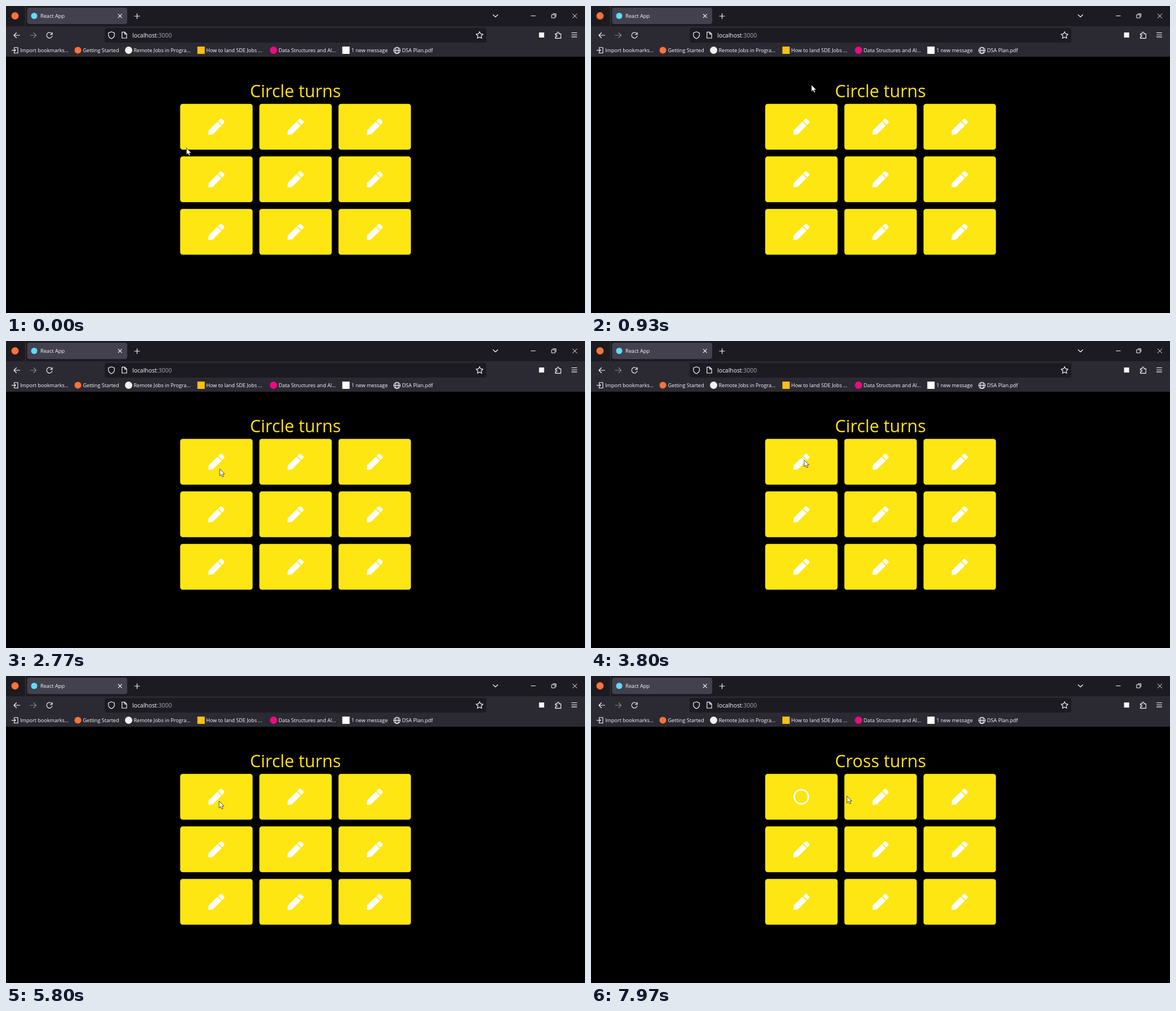
Recreate the animation shown at these times as an HTML page. Size 1027 by 545 pixels, loop 8 s.

```html
<!DOCTYPE html>
<html lang="en">
<head>
<meta charset="utf-8">
<title>React App</title>
<style>
html, body { margin: 0; width: 100%; height: 100%; overflow: hidden; background: #000; }
svg { display: block; width: 1027px; height: 545px; font-family: "Open Sans", "Noto Sans", sans-serif; }
.ui { font-size: 9.07px; fill: #fbfbfe; }
.line { fill: none; stroke: #fbfbfe; stroke-width: 1.15; stroke-linecap: round; stroke-linejoin: round; }
.title { font-size: 30.5px; fill: #ffe21c; text-anchor: middle; }
.before { animation: before 8s step-end infinite; }
.after { animation: after 8s step-end infinite; }
.cursor { animation: roam 8s linear infinite; }
@keyframes before { 0% { visibility: visible } 90%, 100% { visibility: hidden } }
@keyframes after { 0% { visibility: hidden } 90%, 100% { visibility: visible } }
@keyframes roam {
  0% { transform: translate(320px, 252px) }
  4% { transform: translate(327px, 236px) }
  8% { transform: translate(360px, 176px) }
  10.4% { transform: translate(390px, 144px) }
  11.625% { transform: translate(391px, 140px) }
  13.25% { transform: translate(384px, 134px) }
  18.74% { transform: translate(384px, 134px) }
  18.75% { transform: translate(151px, 258px) }
  21.5% { transform: translate(151px, 258px) }
  23.5% { transform: translate(285px, 367px) }
  25.875% { transform: translate(378px, 256px) }
  29.625% { transform: translate(367px, 224px) }
  32% { transform: translate(367px, 224px) }
  32.5% { transform: translate(379px, 226px) }
  34.5% { transform: translate(379px, 226px) }
  35.5% { transform: translate(380px, 234px) }
  37.875% { transform: translate(378px, 211px) }
  47.5% { transform: translate(378px, 211px) }
  50% { transform: translate(381px, 204px) }
  52.5% { transform: translate(379px, 209px) }
  61.75% { transform: translate(379px, 209px) }
  66% { transform: translate(351px, 212px) }
  71.75% { transform: translate(377px, 221px) }
  72.5% { transform: translate(378px, 222px) }
  73.625% { transform: translate(378px, 222px) }
  75.5% { transform: translate(385px, 209px) }
  87.1% { transform: translate(385px, 209px) }
  88% { transform: translate(386px, 208px) }
  90% { transform: translate(386px, 208px) }
  91.75% { transform: translate(381px, 219px) }
  94.5% { transform: translate(390px, 244px) }
  97.5% { transform: translate(438px, 226px) }
  99.6%, 100% { transform: translate(454px, 213px) }
}
</style>
</head>
<body>
<svg viewBox="0 0 1027 545">
  <defs>
    <path id="pen" transform="translate(-14.3 -14.3) scale(.0559)" fill="#fff"
      d="M291 93 419 221 141 499 27 512Q-1 514 0 485L13 371ZM498 74 438 14Q404-14 370 14L313 71 441 199 498 142Q526 108 498 74Z"/>
    <rect id="tile" width="128.4" height="81.2" rx="4.5" fill="#fee612"/>
    <g id="card"><use href="#tile"/><use href="#pen" x="64.1" y="40.6"/></g>
    <g id="pair"><use href="#card" x="449.4" /><use href="#card" x="589.8"/></g>
  </defs>

  <rect width="1027" height="545"/>
  <rect width="1027" height="36" fill="#1c1b22"/>
  <rect y="36" width="1027" height="54" fill="#2b2a33"/>

  <!-- tab strip -->
  <circle cx="16" cy="17.5" r="6.5" fill="#ff7139"/>
  <path d="M34.5 0V36" stroke="#3a3944"/>
  <rect x="37.5" y="3" width="177.5" height="29" rx="4" fill="#42414d"/>
  <circle cx="50" cy="17.5" r="5.5" fill="#61dafb"/>
  <text class="ui" x="61" y="21" style="font-size:9.2px">React App</text>
  <g class="line">
    <path d="M199.2 14.7l6 6m0-6l-6 6M228 18h9m-4.500-4.500v9M864 15.500l4.200 4 4.200-4"/>
    <path stroke-width="1" d="M931.500 17.500h7.500M1005.200 14l7.400 7.400m0-7.400l-7.400 7.400M968.200 15.500h5.600v5.600h-5.600zM970 13.700h5.500v5.500"/>
  </g>

  <!-- toolbar -->
  <rect x="175" y="39" width="677" height="26" rx="4" fill="#1c1b22"/>
  <g class="line">
    <path d="M24.500 52H14m4.500-4.500L14 52l4.500 4.500"/>
    <path stroke="#85848c" d="M43 52h10.500m-4.500-4.500l4.500 4.500-4.500 4.500"/>
    <path d="M81.300 49.200A5 5 0 1 0 82 53M82 47v3.500h-3.500"/>
    <path d="M187 45.800l5.300 2v3.500q0 4.500-5.300 6.700q-5.300-2.200-5.300-6.700v-3.500z"/>
    <path d="M205.700 46.300h5l3.300 3.300v7.400h-8.300zM210.500 46.300v3.500h3.500"/>
    <path d="M840 45.500l1.900 3.900 4.200.6-3.100 3 .8 4.300-3.800-2-3.800 2 .8-4.300-3.100-3 4.200-.6z"/>
    <path d="M974.500 49.300h3v-1.300a1.700 1.700 0 0 1 3.400 0v1.300h3.300v8h-9.700v-2.700h1.300a1.500 1.500 0 0 0 0-3h-1.300z"/>
    <path d="M1003.500 47.500h9m-9 3.700h9m-9 3.700h9"/>
  </g>
  <rect x="945.500" y="47" width="9" height="9" fill="#fbfbfe"/>
  <text class="ui" x="224" y="55.600" style="font-size:10.4px">localhost<tspan fill="#a9a8b0">:3000</tspan></text>

  <!-- bookmarks -->
  <g class="line">
    <path d="M14.500 75.500v-1.800h6.500v9.800h-6.500v-1.800M10.500 78.600h6.500m-2.300-2.300l2.300 2.300-2.300 2.300"/>
    <circle cx="693.500" cy="78.800" r="5.600"/>
    <path d="M688 78.800h11"/>
    <ellipse cx="693.500" cy="78.800" rx="2.500" ry="5.600"/>
  </g>
  <circle cx="127.500" cy="78.500" r="6" fill="#ff7139"/>
  <circle cx="217.500" cy="78.500" r="6.500" fill="#f4f1f2"/>
  <rect x="339.500" y="72" width="13" height="13" fill="#fbc116"/>
  <circle cx="474.500" cy="78.500" r="6.500" fill="#ee0a80"/>
  <rect x="596.500" y="72" width="13" height="13" fill="#fff"/>
  <g class="ui">
    <text x="25" y="82">Import bookmarks...</text>
    <text x="136.500" y="82">Getting Started</text>
    <text x="226.500" y="82">Remote Jobs in Progra...</text>
    <text x="355" y="82">How to land SDE Jobs ...</text>
    <text x="483.500" y="82">Data Structures and Al...</text>
    <text x="612.500" y="82">1 new message</text>
    <text x="702.500" y="82">DSA Plan.pdf</text>
  </g>

  <!-- game -->
  <text class="title before" x="513.500" y="161.500">Circle turns</text>
  <text class="title after" x="513.500" y="161.500">Cross turns</text>
  <use href="#tile" x="309" y="173.800"/>
  <use class="before" href="#pen" x="373.100" y="214.400"/>
  <circle class="after" cx="373" cy="214.500" r="12.600" fill="none" stroke="#fff" stroke-width="2.700"/>
  <use href="#pair" y="173.800"/>
  <use href="#card" x="309" y="267.100"/>
  <use href="#pair" y="267.100"/>
  <use href="#card" x="309" y="360.300"/>
  <use href="#pair" y="360.300"/>

  <path class="cursor" d="M0 0V12.200L2.800 9.600 4.700 14 6.800 13.100 5 8.900H8.700Z" fill="#fff" stroke="#000" stroke-width=".7"/>
</svg>
</body>
</html>
```
